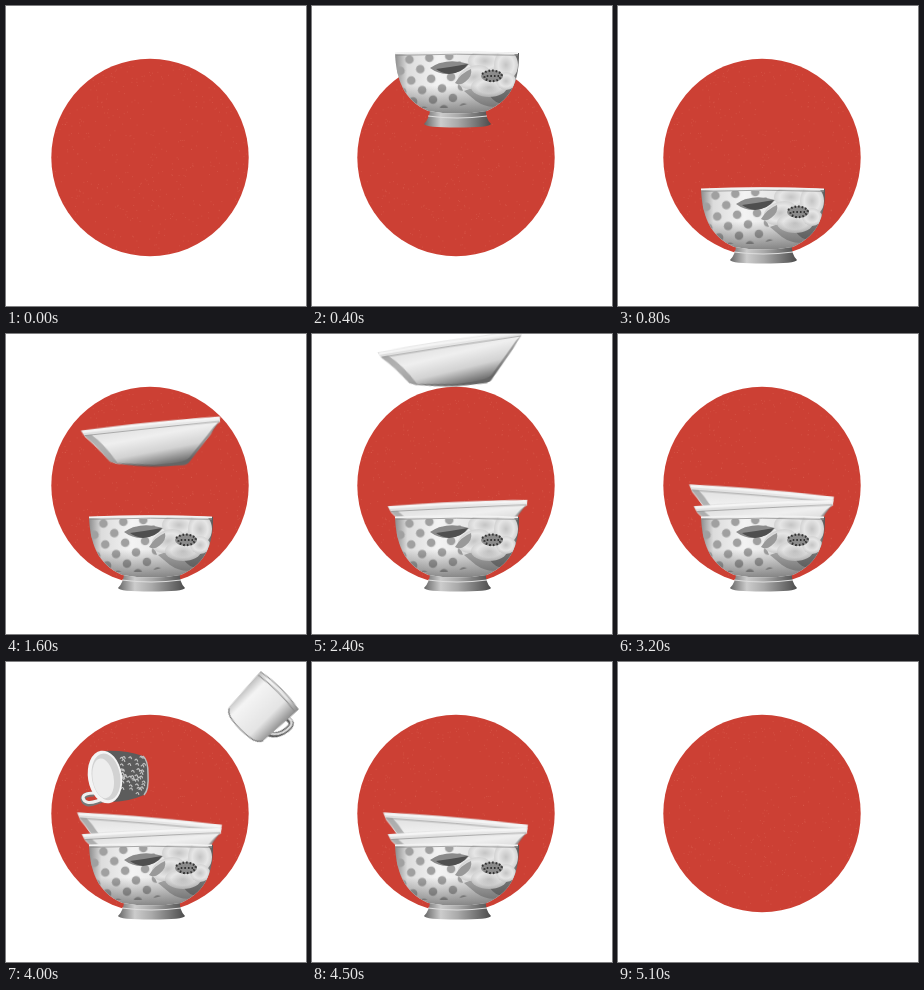
Recreate the animation shown at these times as an HTML page. Size 300 by 300 pixels, loop 5200 ms.

```html
<!DOCTYPE html>
<html lang="en">
<head>
<meta charset="utf-8">
<title>Stacked crockery</title>
<style>
html, body { margin: 0; width: 100%; height: 100%; overflow: hidden; background: #fff; }
svg { display: block; width: 100vw; height: 100vh; }
.move { animation: 5.2s step-end infinite; }
#stack { animation-name: stack; }
#bowl { animation-name: bowl; }
#dish { animation-name: dish; }
#plate { animation-name: plate; }
#cup { animation-name: cup; }
#mug { animation-name: mug; }

/* One step is 100 ms, 1/52 of the loop. */
@keyframes bowl {
  0% { transform: translateY(-272px); animation-timing-function: steps(8); }
  15.384% { transform: none; }
  38.461% { transform: translateY(1px); }
  40.384% { transform: none; }
  59.615% { transform: translateY(1px); }
  61.538%, 100% { transform: none; }
}
@keyframes dish {
  0% { transform: translate(144px, -60px) rotate(-7deg); }
  15.384% { transform: translate(144px, -60px) rotate(-7deg); animation-timing-function: steps(8); }
  30.769% { transform: translate(144px, 90px) rotate(-6.2deg); animation-timing-function: steps(4); }
  38.461% { transform: translate(144px, 165px) rotate(-4deg); }
  40.384%, 100% { transform: translate(145px, 169.5px) rotate(-3deg); }
}
@keyframes plate {
  0% { transform: translate(137px, -69px) rotate(-10deg); }
  38.461% { transform: translate(137px, -69px) rotate(-10deg); animation-timing-function: steps(4); }
  46.153% { transform: translate(137px, 8px) rotate(-9deg); animation-timing-function: steps(7); }
  59.615% { transform: translate(142px, 143px) rotate(2deg); }
  61.538%, 100% { transform: translate(143px, 157px) rotate(4.5deg); }
}
@keyframes cup {
  0% { transform: translate(84px, -60px) rotate(-30deg); }
  61.538% { transform: translate(84px, -40px) rotate(-30deg); animation-timing-function: steps(8); }
  76.923% { transform: translate(108px, 116px); animation-timing-function: steps(5); }
  86.538%, 100% { transform: translate(130px, 201px) rotate(15deg); }
}
@keyframes mug {
  0% { transform: translate(355px, -61px) rotate(56deg); }
  69.23% { transform: translate(355px, -61px) rotate(56deg); animation-timing-function: steps(4); }
  76.923% { transform: translate(255px, 47px) rotate(45deg); animation-timing-function: steps(5); }
  86.538%, 100% { transform: translate(153px, 195px) rotate(20deg); }
}
@keyframes stack {
  0%, 86.538% { transform: none; }
  88.461% { transform: translateY(10px); }
  90.384% { transform: translateY(31px); }
  92.307% { transform: translateY(61px); }
  94.23% { transform: translateY(98px); }
  96.153% { transform: translateY(141px); }
  98.076%, 100% { transform: translateY(200px); }
}
</style>
</head>
<body>
<svg viewBox="0 0 300 300">
  <defs>
    <linearGradient id="side">
      <stop offset="0" stop-color="#8d8d8d"/><stop offset=".1" stop-color="#dcdcdc"/>
      <stop offset=".35" stop-color="#f3f3f3"/><stop offset=".75" stop-color="#dedede"/>
      <stop offset=".94" stop-color="#9a9a9a"/><stop offset="1" stop-color="#555"/>
    </linearGradient>
    <linearGradient id="under" x2="0" y2="1">
      <stop offset=".55" stop-color="#333" stop-opacity="0"/>
      <stop offset="1" stop-color="#333" stop-opacity=".55"/>
    </linearGradient>
    <linearGradient id="glaze" x2=".25" y2="1">
      <stop offset="0" stop-color="#d9d9d9"/><stop offset=".4" stop-color="#efefef"/>
      <stop offset=".72" stop-color="#d2d2d2"/><stop offset="1" stop-color="#777"/>
    </linearGradient>
    <linearGradient id="foot">
      <stop offset="0" stop-color="#666"/><stop offset=".25" stop-color="#ccc"/>
      <stop offset=".5" stop-color="#aaa"/><stop offset="1" stop-color="#4c4c4c"/>
    </linearGradient>
    <linearGradient id="wall">
      <stop offset="0" stop-color="#bbb"/><stop offset=".2" stop-color="#f4f4f4"/>
      <stop offset=".7" stop-color="#e4e4e4"/><stop offset="1" stop-color="#8a8a8a"/>
    </linearGradient>
    <radialGradient id="petal">
      <stop offset="0" stop-color="#c4c4c4"/><stop offset=".65" stop-color="#e6e6e6"/>
      <stop offset="1" stop-color="#d2d2d2"/>
    </radialGradient>
    <pattern id="dots" width="20" height="21" patternUnits="userSpaceOnUse" patternTransform="translate(92 185) rotate(-5)">
      <g fill="#a0a0a0"><circle cx="5" cy="5" r="4.3"/><circle cx="15" cy="15.5" r="4.3"/></g>
    </pattern>
    <path id="body" d="M83 183Q144 180 207 183C207 206 203 228 175 241Q145 246 116 241C91 230 84 208 83 183Z"/>
    <clipPath id="bodyClip"><use href="#body"/></clipPath>
    <g id="saucer">
      <path fill="url(#glaze)" d="M-69.5-1Q0-3 70.5 0L69.8 5.6Q65 9 59.6 16.5L35.8 41Q33 44.5 29.4 44.4Q0 45-38 36L-44-33.5V33.5L-66 6Z"/>
    </g>
    <g id="basin">
      <path fill="url(#glaze)" d="M-69.5-1Q0-3 70.5 0L69.8 5.6Q65 8 59.6 16.5L35.8 41Q33 44.5 29.4 44.4Q0 44-38 36L-44 33Q-57 15-66 6Z"/>
      <path fill="#555" fill-opacity=".5" d="M70 4Q62 10 57 16L35 38Q30 42 0 41L-38 35Q-20 41 0 43.6L29 44.5Q34 44 36 41L60 16Z"/>
      <path fill="#777" fill-opacity=".5" d="M-67 4Q-55 16-44 33L-36 36Q-48 14-60 4Z"/>
      <path fill="none" stroke="#f5f5f5" stroke-width="2.4" d="M-68 .5Q0-.8 69 1.5"/>
      <path fill="none" stroke="#999" stroke-width=".8" d="M-66 4.5Q0 4 69 5"/>
    </g>
  </defs>

  <circle cx="144" cy="151.5" r="98.7" fill="#cc4034"/>
  <path id="grain" fill="none" stroke="#e0705f" stroke-opacity=".6" stroke-width=".7"/>

  <g id="stack" class="move">
    <g id="mug" class="move">
      <path fill="none" stroke="#555" stroke-width="5" d="M22-12H29Q34-12 33-4Q32 8 22 13"/>
      <path fill="none" stroke="#ddd" stroke-width="2.4" d="M22-13H29Q34-12 33-4Q32 7 22 12"/>
      <path fill="url(#wall)" d="M-27-26Q0-31 27-26L24 21Q22 27 13 28Q0 30-13 28Q-22 27-24 21Z"/>
      <path fill="none" stroke="#8c8c8c" d="M-27-26Q0-31 27-26M-26-22Q0-26 26-22"/>
      <path fill="none" stroke="#777" stroke-width="1.2" d="M-23 22Q-20 27-13 28Q0 30 13 28Q21 27 24 21"/>
    </g>

    <g id="cup" class="move">
      <path fill="#5c5c5c" d="M-10-27Q12-28 29-22Q34-18 34-4Q35 12 30 17Q14 24-4 24Z"/>
      <path id="print" fill="none" stroke="#c2c2c2" stroke-width="1.2"/>
      <path fill="none" stroke="#bbb" stroke-width="1.5" d="M29-22Q34-18 34-4Q35 12 30 17"/>
      <path fill="none" stroke="#777" stroke-width="5" d="M-20 16Q-31 16-31 21Q-29 29-17 24L-9 21"/>
      <path fill="none" stroke="#eee" stroke-width="3" d="M-20 15Q-31 15-31 20Q-29 27-17 23L-9 20"/>
      <g transform="translate(-9 -1) rotate(-9)">
        <ellipse rx="17" ry="26.5" fill="#f4f4f4"/>
        <ellipse cx="1" rx="14.2" ry="23.5" fill="#d2d2d2"/>
        <ellipse cx="-2" cy="1" rx="10.5" ry="20" fill="#ededed"/>
      </g>
    </g>

    <g id="plate" class="move"><use href="#basin" transform="scale(1.04)"/></g>
    <g id="dish" class="move"><use href="#basin"/></g>

    <g id="bowl" class="move">
      <path fill="url(#foot)" d="M118 238H174Q173 248 179 254Q178 257.5 145 257.5Q113 257.5 112 254Q118 248 118 238Z"/>
      <path fill="none" stroke="#ddd" stroke-width="1.2" d="M116 246Q145 250 175 246"/>
      <use href="#body" fill="url(#side)"/>
      <g clip-path="url(#bodyClip)">
        <path fill="url(#dots)" d="M82 185H150L146 205Q150 225 160 233L140 238H82Z"/>
        <path fill="#aaa" d="M152 221Q172 212 206 215L198 232Q180 242 164 231Z"/>
        <path fill="#777" d="M178 226Q192 217 205 218L194 233Q184 235 178 226Z"/>
        <g fill="url(#petal)">
          <ellipse cx="173" cy="191" rx="17" ry="11"/>
          <ellipse cx="194" cy="195" rx="12" ry="15"/>
          <ellipse cx="162" cy="207" rx="17" ry="11" transform="rotate(-20 162 207)"/>
          <ellipse cx="177" cy="217" rx="18" ry="10"/>
          <ellipse cx="194" cy="211" rx="10" ry="9"/>
        </g>
        <ellipse cx="180" cy="206" rx="11" ry="6" fill="#8b8b8b"/>
        <path fill="none" stroke="#333" stroke-width="2.2" stroke-dasharray="1.6 2" d="M170 204Q180 197 190 204Q188 212 178 211Q171 209 173 206H187"/>
        <path fill="#8a8a8a" d="M118 198Q134 187 157 194Q150 203 136 204Q126 204 118 198Z"/>
        <path fill="#4f4f4f" d="M124 199Q139 197 156 194Q150 203 137 204Q129 203 124 199Z"/>
        <path fill="#999" d="M143 213Q149 203 159 199Q161 206 153 212Q148 216 143 213Z"/>
        <use href="#body" fill="url(#under)"/>
      </g>
      <path fill="none" stroke="#f2f2f2" stroke-width="1.8" d="M83 183.4Q144 181 206 183.4"/>
      <path fill="none" stroke="#888" stroke-width=".7" d="M84 185.4Q144 183 206 185.4"/>
    </g>
  </g>
</svg>
<script>
let seed = 7;
const rand = () => (seed = seed * 16807 % 2147483647) / 2147483647;
const repeat = (n, mark) => Array.from({ length: n }, mark).join('');
const draw = (id, d) => document.getElementById(id).setAttribute('d', d);

// Paper flecks spread evenly over the disc.
draw('grain', repeat(420, () => {
  const r = 97 * Math.sqrt(rand()), a = rand() * 2 * Math.PI;
  return `M${(144 + r * Math.cos(a)).toFixed(1)} ${(151.5 + r * Math.sin(a)).toFixed(1)}h.8`;
}));

// Scrolls printed on the dark cup.
draw('print', repeat(46, () =>
  `M${(6 + rand() * 23).toFixed(1)} ${(rand() * 38 - 21).toFixed(1)}q2-3 3 1`));
</script>
</body>
</html>
```
